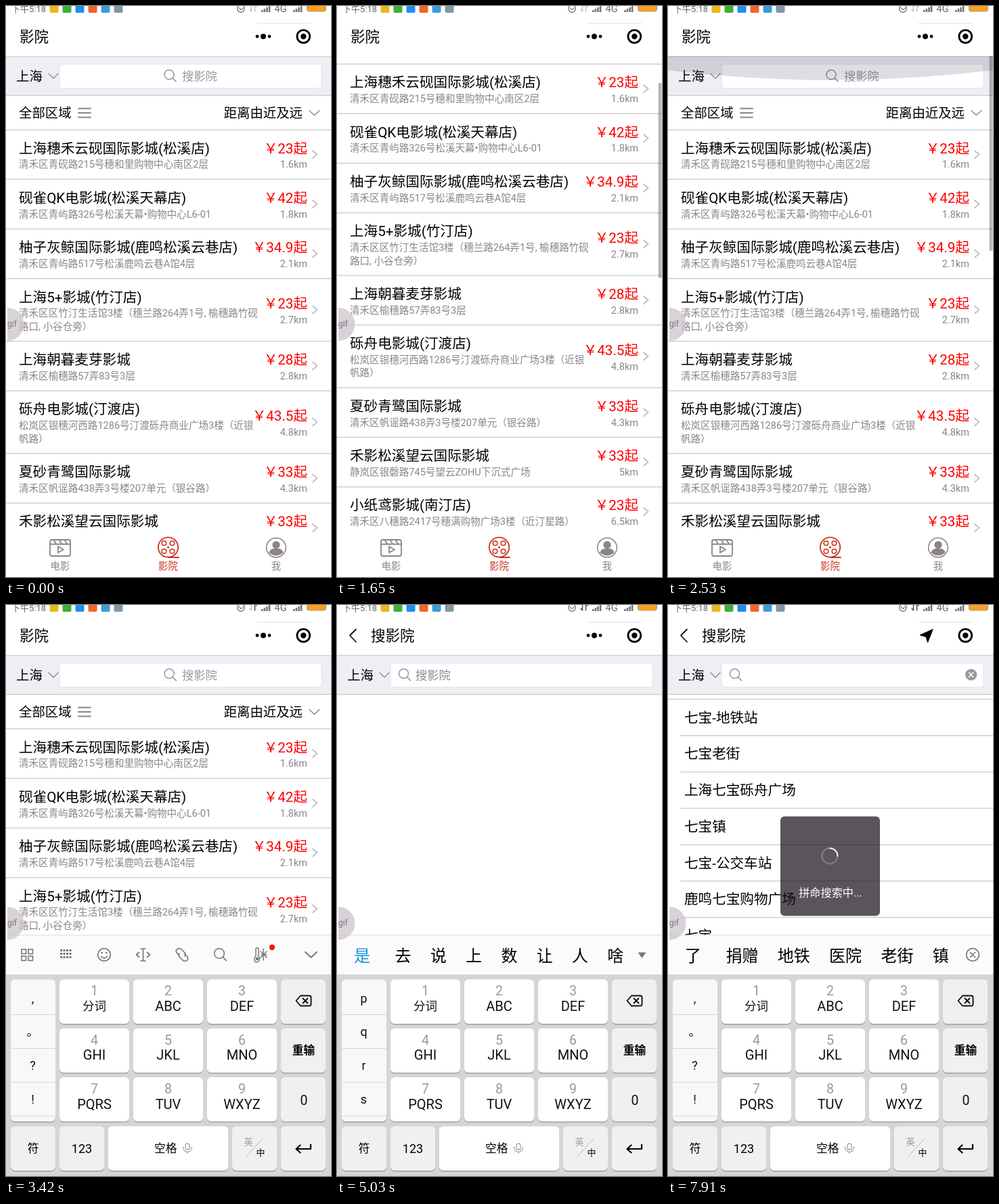
An HTML page for the animation above (8 s loop, 480 px wide and 844 px high).

```html
<!DOCTYPE html>
<html lang="zh-CN">
<head>
<meta charset="utf-8">
<style>
html, body { margin: 0; width: 100%; height: 100%; overflow: hidden; background: #fff; }
svg { display: block; font-family: Roboto, "Noto Sans CJK SC", "Noto Sans CJK", sans-serif; }
</style>
</head>
<body>
<svg id="stage" width="480" height="844" viewBox="0 0 480 844"></svg>
<script>
const LOOP = 8000, MID = 'text-anchor="middle"', END = 'text-anchor="end"';
const GRAY = '#8a848a', LINE = '#d2d0d2';

// y is the visual middle of the glyphs
const text = (x, y, size, str, fill = '#000', attr = '') =>
  `<text x="${x}" y="${y + size * .37}" font-size="${size}" fill="${fill}" ${attr}>${str}</text>`;
const rect = (x, y, w, h, fill, r = 0, attr = '') =>
  `<rect x="${x}" y="${y}" width="${w}" height="${h}" rx="${r}" fill="${fill}" ${attr}/>`;
const path = (d, stroke = GRAY, w = 2, fill = 'none') =>
  `<path d="${d}" stroke="${stroke}" stroke-width="${w}" fill="${fill}" stroke-linecap="round" stroke-linejoin="round"/>`;
const circle = (x, y, r, fill, stroke = 'none', w = 2) =>
  `<circle cx="${x}" cy="${y}" r="${r}" fill="${fill}" stroke="${stroke}" stroke-width="${w}"/>`;
const group = (id, ...parts) => `<g id="${id}">${parts.join('')}</g>`;
const rule = (y, x = 0) => rect(x, y - .75, 480 - x, 1.5, LINE);
const lens = (x, y, r, color) => circle(x, y, r, 'none', color, 1.5) +
  path(`M${x + r * .7} ${y + r * .7}l${r * .75} ${r * .75}`, color, 1.6);

const cinemas = [
  ['上海穗禾云砚国际影城(松溪店)', '23', '1.6', '清禾区青砚路215号穗和里购物中心南区2层'],
  ['砚雀QK电影城(松溪天幕店)', '42', '1.8', '清禾区青屿路326号松溪天幕•购物中心L6-01'],
  ['柚子灰鲸国际影城(鹿鸣松溪云巷店)', '34.9', '2.1', '清禾区青屿路517号松溪鹿鸣云巷A馆4层'],
  ['上海5+影城(竹汀店)', '23', '2.7', '清禾区区竹汀生活馆3楼（穗兰路264弄1号, 榆穗路竹砚', '路口, 小谷仓旁）'],
  ['上海朝暮麦芽影城', '28', '2.8', '清禾区榆穗路57弄83号3层'],
  ['砾舟电影城(汀渡店)', '43.5', '4.8', '松岚区银穗河西路1286号汀渡砾舟商业广场3楼（近银', '帆路）'],
  ['夏砂青鹭国际影城', '33', '4.3', '清禾区帆谣路438弄3号楼207单元（银谷路）'],
  ['禾影松溪望云国际影城', '33', '5', '静岚区银磬路745号望云ZOHU下沉式广场'],
  ['小纸鸢影城(南汀店)', '23', '6.5', '清禾区八穗路2417号穗满购物广场3楼（近汀星路）']
];

function cinemaList() {
  let top = 183, out = '';
  for (const [name, price, km, ...address] of cinemas) {
    const tall = address.length > 1, drop = tall ? 9.6 : 0;
    out += rule(top) + text(19, top + 27, 20.6, name) +
      address.map((line, i) => text(19, top + 51 + i * 19.5, 14.55, line, GRAY)).join('') +
      text(445, top + 27 + drop, 20.6, `￥${price}起`, '#f00', END) +
      text(445, top + 51 + drop, 14.5, km + 'km', GRAY, END) +
      path(`M453 ${top + 31 + drop}l6.5 5.5 -6.5 5.5`, '#c4c2c8');
    top += tall ? 92.6 : 73.3;
  }
  return out + rule(top);
}

const searchBar = (iconX, hint) =>
  rect(0, 74, 480, 58, '#efeef4') + rule(74.5) + rule(132.3) +
  rect(79, 86, 387, 35.5, '#fff', 4, 'stroke="#e4e2e8"') +
  text(15, 104, 19.4, '上海') + path('M63 100l7 7 7 -7', GRAY, 1.3) +
  lens(iconX, 101.5, 7, '#999') + hint;

const tabs = rect(0, 778, 480, 66, '#fff') +
  path('M68 789h24q3 0 3 3v18q0 3 -3 3h-24q-3 0 -3 -3v-18q0 -3 3 -3zM66 795.5h28M71 790l3 5M79 790l3 5M87 790l3 5M77 799l8 4.5 -8 4.5z', GRAY, 1.8) +
  text(80, 828, 14.4, '电影', GRAY, MID) +
  circle(239.5, 800, 14.7, 'none', '#cc341c', 1.8) +
  [[-6, -6], [6, -6], [-6, 6], [6, 6]].map(([x, y]) => circle(239.5 + x, 800 + y, 3.3, 'none', '#cc341c', 1.6)).join('') +
  circle(239.5, 800, 1.6, '#cc341c') + path('M240 815h15', '#cc341c', 1.8) +
  text(239.5, 828, 14.4, '影院', '#cc341c', MID) +
  circle(399, 800.5, 14.3, 'none', GRAY, 1.5) + circle(399, 796.5, 5.6, GRAY) +
  path('M389 808q1 -5 6 -5.500h8q5 .5 6 5.500q-10 8 -20 0z', GRAY, 1, GRAY) +
  text(399, 828, 14.4, '我', GRAY, MID);

const home = group('home',
  rect(0, 0, 480, 844, '#fff'),
  group('scroll',
    searchBar(241, text(260, 104, 17.3, '搜影院', '#999')),
    text(19, 158, 19.4, '全部区域'), path('M107 151.500h18M107 158h18M107 164.500h18', GRAY, 1.8),
    text(438, 158, 19.4, '距离由近及远', '#000', END), path('M448 154.500l7.500 7 7.500 -7', GRAY, 1.3),
    cinemaList()),
  group('glow', path('M0 74H480V95Q240 124 0 95Z', 'none', 0, 'rgba(40,30,60,.15)')),
  group('thumb', rect(474.5, 74, 5, 288, 'rgba(0,0,0,.28)')),
  rect(0, 0, 480, 74, '#fff'), text(20, 45, 21.5, '影院'), tabs);

const places = ['七宝-地铁站', '七宝老街', '上海七宝砾舟广场', '七宝镇', '七宝-公交车站', '鹿鸣七宝购物广场', '七宝'];
const search = group('search',
  rect(0, 0, 480, 844, '#fff'),
  path('M28 36l-9 9 9 9.500', '#111', 1.8), text(50, 45, 21.5, '搜影院'),
  searchBar(98.5, group('hint', text(116, 104, 17.3, '搜影院', '#8c8c8c'))),
  group('typed', text(116, 104, 17.3, '七宝')),
  group('clear', circle(447.7, 103, 8.6, '#9a9a9a'), path('M444.500 99.800l6.400 6.400M450.900 99.800l-6.400 6.400', '#fff', 1.6)),
  group('places', places.map((name, i) =>
    rule(139.3 + i * 53.75, i ? 18 : 0) + text(24, 166 + i * 53.75, 20.6, name)).join('')));

const key = (x, y, w, fill, label = '') =>
  rect(x, y + 1.5, w, 65.5, '#a09ea0', 6) + rect(x, y, w, 65.5, fill, 6) + label;
const PALE = '#f1eff1', ICON = '#777';
const letters = ['分词', 'ABC', 'DEF', 'GHI', 'JKL', 'MNO', 'PQRS', 'TUV', 'WXYZ'];
const digitKeys = letters.map((label, i) => {
  const x = 79 + i % 3 * 109, y = 553.5 + Math.floor(i / 3) * 72.3;
  return key(x, y, 103, '#fff', text(x + 51.5, y + 16.5, 19.5, i + 1, '#999', MID) +
    text(x + 51.5, y + 39, i ? 20 : 17.5, label, '#111', MID));
}).join('');

const tools = group('tools',
  [[23, 509], [33, 509], [23, 519], [33, 519]].map(([x, y]) => rect(x, y, 6.5, 6.5, 'none', 0, `stroke="${ICON}" stroke-width="1.6"`)).join(''),
  [510, 515, 520].map(y => path(`M80 ${y + .5}h17`, ICON, 3.2).replace('/>', ' style="stroke-linecap:butt" stroke-dasharray="3 1.5"/>')).join(''),
  circle(145, 517, 9.3, 'none', ICON, 1.7), circle(141.7, 514, 1.3, ICON), circle(148.3, 514, 1.3, ICON),
  path('M140.500 519.500q4.500 4.500 9 0M199 508h7M199 526h7M202.500 508v18M196.500 513.500l-4 3.500 4 3.500M208.500 513.500l4 3.500 -4 3.500', ICON, 1.7),
  path('M256 518l-3 -3q-4 -5 1 -7q3 -1 5 1l5 5q2 3 0 5M264 516l3 3q4 5 -1 7q-3 1 -5 -1l-5 -5q-2 -3 0 -5', ICON, 1.7),
  lens(315, 515, 7.3, ICON),
  path('M369 519v-11q2 -3 4 0v11q3 4 0 8q-3 2 -5 0q-3 -4 1 -8z', ICON, 1.5), circle(371, 523, 2.4, ICON),
  path('M380 508v17M376 512l9 9M376 521l9 -9M377 517h8', ICON, 1.5), circle(393, 506, 4.2, '#f01818'),
  path('M442 513l8.500 8 8.500 -8', ICON, 2));

const keyboard = group('keyboard',
  group('pinyin'),
  rect(0, 488, 480, 58, '#fcfbfc'), rect(0, 487.5, 480, 1, '#dedde0'),
  rect(0, 546, 480, 298, '#d6d5d6'),
  tools, group('words'),
  rect(7, 555, 66, 210, '#a09ea0', 6), rect(7, 553.5, 66, 210, '#f9f7f9', 6),
  [605, 655, 705, 755].map(y => rect(7, y, 66, 1, '#d8d6d8')).join(''),
  group('side'), digitKeys,
  key(406, 553.5, 66, PALE, path('M435 577.500h13q2.500 0 2.500 2.500v10q0 2.500 -2.500 2.500h-13l-6.500 -7.500zM438.500 581.500l7 7M445.500 581.500l-7 7', '#111', 1.9)),
  key(406, 625.8, 66, PALE, text(439.5, 658, 16.7, '重输', '#000', MID + ' font-weight="700"')),
  key(406, 698.1, 66, PALE, text(440, 731.5, 19.5, '0', '#111', MID)),
  key(7, 770.5, 66, PALE, text(40, 803, 16.7, '符', '#000', MID + ' font-weight="500"')),
  key(79, 770.5, 66, PALE, text(112, 803, 18, '123', '#000', MID)),
  key(151, 770.5, 177, '#fff', text(219, 803, 16.7, '空格', '#000', 'font-weight="500"') +
    path('M268 796q3 0 3 3v3q0 3 -3 3t-3 -3v-3q0 -3 3 -3zM261.500 801q.5 7 6.500 7.500q6 -.5 6.500 -7.500M268 808.500v2', '#aaa', 1.4)),
  key(334, 770.5, 66, PALE, text(358, 793, 13, '英', '#999', MID) + path('M355 815l24 -26', '#bbb', 1) +
    text(376, 809, 13, '中', '#000', MID + ' font-weight="500"')),
  key(406, 770.5, 66, PALE, path('M450 797.500v6.500h-21M434.500 798.500l-6 5.500 6 5.500', '#000', 2.2)));

const signal = x => [3, 5, 7, 9].map((h, i) => rect(x + i * 3.6, 9 - h, 2.6, h, '#777')).join('');
const status = rect(0, 0, 480, 14, '#fff') +
  text(8, 4.2, 13, '下午5:18', '#666') +
  ['#e8b81c', '#3cb034', '#1e90e8', '#f0642c', '#3c9cd8', '#8098a8'].map((c, i) => rect(64.5 + i * 19, -3, 13, 13, c, 2)).join('') +
  circle(347, 4, 5.2, 'none', '#777', 1.4) + path('M344.500 3l2.500 2.500 3 -2', '#777', 1.2) +
  group('down', path('M362.500 -2v10l-2.500 -3', '#555', 1.6)) + group('up', path('M367.500 8v-10l2.500 3', '#555', 1.6)) +
  signal(377) + text(396.5, 4, 14.5, '4G', '#666') + signal(424) +
  rect(444.5, -4, 28, 12, '#ff9f1a', 3, 'stroke="#a89888"');

const capsule = path('M370 25.500h80', '#e4e4e4', 1) +
  group('dots', circle(371, 45, 2.4, '#000'), circle(380, 45, 4, '#000'), circle(389, 45, 2.4, '#000')) +
  group('arrow', path('M391 36l-19 8.500 9 2.500 2.500 8z', '#000', 1, '#000')) +
  circle(439.3, 45, 9.4, 'none', '#000', 2.8) + circle(439.3, 45, 4.2, '#000');

const toast = group('toast', rect(166, 312.5, 147, 147, 'rgba(20,14,20,.7)', 6),
  circle(239, 371, 11.5, 'none', 'rgba(255,255,255,.25)', 2),
  group('spin', path('M239 359.500a11.500 11.500 0 0 1 11.500 11.500', '#eee', 2)),
  text(240, 425.5, 16.2, '拼命搜索中...', '#fff', MID));

const badge = '<path d="M2 446A24.500 24.500 0 0 1 2 495Z" fill="rgba(205,196,205,.75)"/>' + text(2, 470, 12, 'gif', '#777');

document.getElementById('stage').innerHTML =
  home + search + group('caret', rect(0, 92, 1.6, 23, '#444')) + capsule + status + toast + keyboard + badge;

const el = id => document.getElementById(id);
const show = (id, on) => el(id).setAttribute('opacity', +on);
const move = (id, x, y) => el(id).setAttribute('transform', `translate(${x} ${y})`);

// start, pinyin, side column, candidate words
const marks = ', 。 ? !';
const input = [
  [0, '', marks, ''],
  [4850, '', 'p q r s', '是 去 说 上 数 让 人 啥'],
  [5110, 'qi', 'qi pi ri si', '其 起 期 气 七 器 齐 骑'],
  [5300, 'qi b', 'qi pi ri si', '期 起 七百 其 气 七 器'],
  [5490, 'qi ba', 'qi pi ri si', '七八 起 七 其 气 器'],
  [5640, 'qi bao', 'qi pi ri si', '七宝 起 七 其 气 器'],
  [6050, '', marks, '了 捐赠 地铁 医院 老街 镇']
];

let shown;
function setInput(state) {
  if (state === shown) return;
  shown = state;
  const [, pinyin, side, words] = state, typing = words && side !== marks;
  el('pinyin').innerHTML = pinyin && rect(0, 465, 22 + pinyin.length * 8, 23, '#fcfbfc') + text(9, 477, 15, pinyin, '#333');
  el('side').innerHTML = side.split(' ').map((s, i) => text(39.5, 581 + i * 49.8, 18, s, '#111', MID)).join('');
  let x = 25;
  el('words').innerHTML = words && words.split(' ').map((word, i) => {
    const out = text(x, 518, 24, word, typing && !i ? '#1296db' : '#000');
    x += word.length * 24 + (i ? 28.3 : 36.5);
    return out;
  }).join('') + (typing ? path('M445.500 514h10l-5 7z', '#777', 1, '#777')
    : circle(450, 517, 9.3, 'none', ICON, 1.7) + path('M446.500 513.500l7 7M453.500 513.500l-7 7', ICON, 1.7));
  show('tools', !words);
}

function draw(t) {
  const span = (a, b) => Math.min(1, Math.max(0, (t - a) / (b - a)));
  const out = (a, b) => 1 - (1 - span(a, b)) ** 2;
  const within = (a, b) => t >= a && t < b;

  const scroll = 106 * (out(1110, 1870) - out(1940, 2430));
  move('scroll', 0, -scroll);
  move('thumb', 0, scroll * .409);
  show('thumb', t < 1150 ? 0 : 1 - span(2620, 2720));
  show('glow', span(2400, 2500) * (1 - span(2560, 2720)));

  move('search', 480 * (1 - out(3600, 3950)), 0);
  move('keyboard', 0, 362 * (1 - out(2780, 3200) + out(3600, 3780) - out(3980, 4310)));
  setInput(input.filter(s => s[0] <= t).pop());

  show('hint', t < 6050);
  show('typed', within(6050, 7910));
  show('clear', t >= 6050);
  show('places', t >= 6620);
  show('caret', within(3000, 3420) || within(6050, 7250));
  move('caret', t < 5000 ? 116 : 149.5, 0);

  show('toast', t >= 7810);
  el('spin').setAttribute('transform', `rotate(${(t - 7910) * .36} 239 371)`);
  show('dots', t < 7810);
  show('arrow', t >= 7810);
  const busy = within(3000, 5200) || t >= 7250;
  show('up', busy ? 1 : .35);
  show('down', busy && t > 3650 ? 1 : .35);
}

(function tick() {
  draw(performance.now() % LOOP);
  requestAnimationFrame(tick);
})();
</script>
</body>
</html>
```
